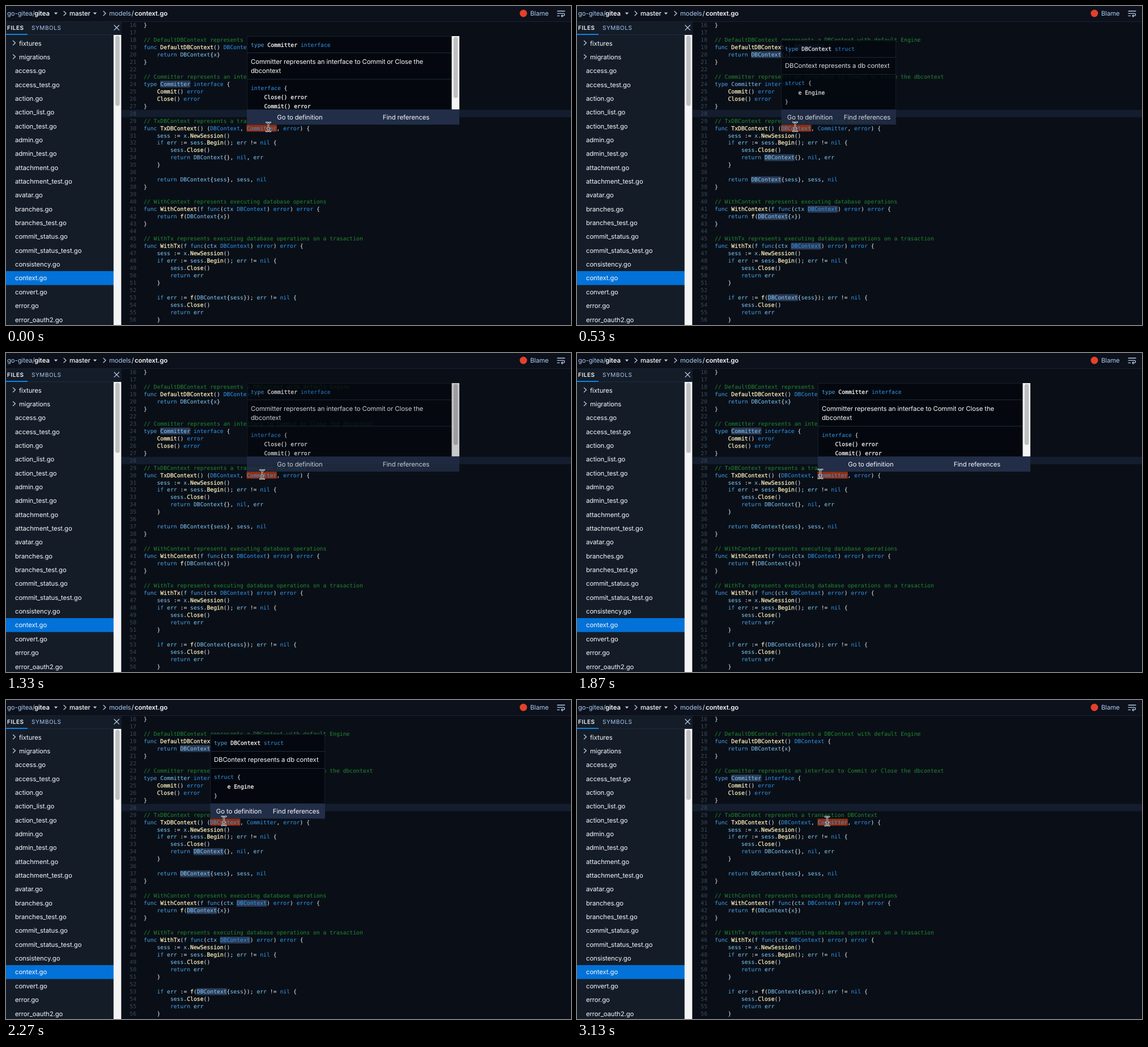
These frames come from a looping animation (997x562 px, 3.19 s). An HTML page:

```html
<!DOCTYPE html>
<html lang="en">
<head>
<meta charset="utf-8">
<title>Code hovers</title>
<style>
  html, body { margin: 0; width: 100%; height: 100%; overflow: hidden; background: #0a0f17; }
  svg { display: block; width: 997px; height: 562px; }
  text { white-space: pre; text-rendering: geometricPrecision; }
  .ui { font: 11.35px Inter, "Open Sans", sans-serif; letter-spacing: -.1px; fill: #f7f9fc; }
  .mono { font: 9.74px "DejaVu Sans Mono", monospace; fill: #edf1f7; }
  .soft { fill: #a8caf0; }
  .medium { font-weight: 500; }
  .bold { font-weight: 600; }
  .tab { font-size: 10px; letter-spacing: .55px; }
  .number { fill: #3c4858; text-anchor: end; }
  .middle { text-anchor: middle; }
  .comment { fill: #21882f; }
  .keyword { fill: #4aa3ea; }
  .type { fill: #2f98f2; }
  .call { fill: #fff3bf; stroke: #fff3bf; stroke-width: .25; }
  .title { fill: #fff; stroke: #fff; stroke-width: .25; }
  .name { fill: #84ccfc; }
  .line { fill: none; stroke: #b9cbe4; stroke-width: 1.3; stroke-linecap: round; stroke-linejoin: round; }
</style>
</head>
<body>
<svg id="stage" viewBox="0 0 997 562"></svg>
<script>
const LOOP = 3190, STEP = 200 / 3;
const CODE_X = 243, CHAR = 5.864, FIRST_LINE = 16;

const code = `}

// DefaultDBContext represents a DBContext with default Engine
func DefaultDBContext() DBContext {
    return DBContext{x}
}

// Committer represents an interface to Commit or Close the dbcontext
type Committer interface {
    Commit() error
    Close() error
}

// TxDBContext represents a transaction DBContext
func TxDBContext() (DBContext, Committer, error) {
    sess := x.NewSession()
    if err := sess.Begin(); err != nil {
        sess.Close()
        return DBContext{}, nil, err
    }

    return DBContext{sess}, sess, nil
}

// WithContext represents executing database operations
func WithContext(f func(ctx DBContext) error) error {
    return f(DBContext{x})
}

// WithTx represents executing database operations on a trasaction
func WithTx(f func(ctx DBContext) error) error {
    sess := x.NewSession()
    if err := sess.Begin(); err != nil {
        sess.Close()
        return err
    }

    if err := f(DBContext{sess}); err != nil {
        sess.Close()
        return err
    }`.split("\n");

const files = ["fixtures", "migrations", "access.go", "access_test.go", "action.go", "action_list.go",
  "action_test.go", "admin.go", "admin_test.go", "attachment.go", "attachment_test.go", "avatar.go",
  "branches.go", "branches_test.go", "commit_status.go", "commit_status_test.go", "consistency.go",
  "context.go", "convert.go", "error.go", "error_oauth2.go"];

const lineY = n => 33.3 + (n - FIRST_LINE) * 12.98;
const rect = (x, y, w, h, fill, rx = 0) =>
  `<rect x="${x}" y="${y}" width="${w}" height="${h}" rx="${rx}" fill="${fill}"/>`;
const label = (x, y, content, cls = "") => `<text class="ui ${cls}" x="${x}" y="${y + 4}">${content}</text>`;
const mono = (x, y, content, cls = "") => `<text class="mono ${cls}" x="${x}" y="${y + 3.5}">${content}</text>`;
const path = (d, cls = "line") => `<path class="${cls}" d="${d}"/>`;
const span = (cls, content) => `<tspan class="${cls}">${content}</tspan>`;
const caret = x => `<path d="M${x - 3.2} 11.5h6.4l-3.2 3.6z" fill="#c3d1e6"/>`;
const chevron = (x, y) => path(`M${x - 2} ${y - 3.7}l4 3.7l-4 3.7`);
const scrollbar = (x, y, height, thumb) =>
  rect(x, y, 13.5, height, "#f4f4f5") + rect(x + 3.2, y + 1.5, 7.6, thumb, "#bfc0c2", 3.8);

function colourLine(source) {
  if (source.startsWith("//")) return span("comment", source);
  return source.replace(/[A-Za-z]\w*/g, (word, at) => {
    const next = source[at + word.length];
    if (/^(func|type|return|if)$/.test(word)) return span("keyword", word);
    if (/^(error|nil|interface|struct)$/.test(word)) return span("type", word);
    if (next === "(") return span("call", word);
    const isType = /^(DBContext|Committer)$/.test(word) && next !== "{" && !source.startsWith("type");
    return span(isType ? "type" : "name", word);
  });
}

function highlights(word) {
  let marks = "";
  code.forEach((source, i) => {
    if (source.startsWith("//")) return;
    for (const match of source.matchAll(new RegExp(`\\b${word}\\b`, "g"))) {
      const line = i + FIRST_LINE;
      marks += rect(CODE_X + match.index * CHAR - .3, lineY(line) - 5.7, word.length * CHAR + .6, 12,
        line === 30 ? "#922f10" : "#2a3a54", 1);
    }
  });
  return `<g id="marks${word}">${marks}</g>`;
}

function header() {
  return rect(0, 0, 997, 27, "#0c111b") + rect(0, 27, 997, 1, "#1a2434") +
    label(2, 13, "go-gitea/", "soft") + label(50, 13, "gitea", "bold") + caret(88) + chevron(104, 13) +
    label(112, 13, "master", "medium") + caret(157) + chevron(174, 13) +
    label(182, 13, "models", "soft") + label(221.5, 13, "/") + label(227, 13, "context.go", "bold") +
    `<circle cx="913" cy="13" r="6.5" fill="#e5402b"/>` + label(925, 13, "Blame", "soft") +
    path("M973 9h13M973 13.2h10.5a2 2 0 0 1 0 4.2h-3.5m1.7-1.8l-1.8 1.8l1.8 1.8M973 17.4h3.5");
}

function sidebar() {
  const pitch = 24.35;
  const rows = files.map((name, i) => {
    const y = 65.5 + i * pitch, folder = i < 2;
    return (name === "context.go" ? rect(0, y - 12.4, 190, pitch + .2, "#0272d8") : "") +
      (folder ? chevron(14.5, y - .5) : "") + label(folder ? 23 : 16, y, name);
  }).join("");
  return rect(0, 28, 204, 534, "#141c28") +
    label(2, 38.3, "FILES", "tab bold") + label(45, 38.3, "SYMBOLS", "tab soft") +
    path("M191 34l8.4 8.4M199.4 34l-8.4 8.4") +
    rect(0, 50, 204, 1, "#202c3f") + rect(0, 49, 38, 2, "#0a84e8") + rows +
    scrollbar(189.8, 51, 511, 123.5);
}

function popup({ id, x, y, width, dividers, body, actions, bar = "" }) {
  return `<g id="popup${id}">` + rect(x, y, width, 209 - y, "#1c273a") +
    rect(x + .7, y + .7, width - 1.4, 208 - y, "#04080e") +
    dividers.map(d => rect(x, d, width, 1, "#1d2a3e")).join("") + body + bar +
    rect(x, 182.3, width, 26.7, "#222e47") +
    actions.map(([cx, name]) => label(cx, 196, name, "middle")).join("") + "</g>";
}

const actionNames = ["Go to definition", "Find references"];
const committerPopup = popup({
  id: "Committer", x: 425, y: 53, width: 375, dividers: [82, 128.5],
  body: mono(432, 68, `${span("keyword", "type")} ${span("title", "Committer")} ${span("type", "interface")}`) +
    label(432, 98, "Committer represents an interface to Commit or Close the") + label(432, 114.3, "dbcontext") +
    mono(432, 144.3, `${span("type", "interface")} {`) +
    mono(432, 160.5, `    ${span("title", "Close() error")}`) + mono(432, 176.8, `    ${span("title", "Commit() error")}`),
  actions: [[518.5, actionNames[0]], [706, actionNames[1]]],
  bar: scrollbar(786.5, 53, 129.5, 107.5)
});
const contextPopup = popup({
  id: "DBContext", x: 360.5, y: 60, width: 202.5, dividers: [90, 120],
  body: mono(367, 75.5, `${span("keyword", "type")} ${span("title", "DBContext")} ${span("type", "struct")}`) +
    label(367, 105, "DBContext represents a db context") +
    mono(367, 135.7, `${span("type", "struct")} {`) +
    mono(367, 152, `    ${span("title", "e Engine")}`) + mono(367, 168, "}"),
  actions: [[411, actionNames[0]], [512, actionNames[1]]]
});

const beam = "M-3.8 -8Q0 -8 0 -5Q0 -8 3.8 -8M0 -5V5M-3.8 8Q0 8 0 5Q0 8 3.8 8M-2 2.5H2";
const cursor = `<g id="cursor" fill="none" stroke-linecap="round">
  <path d="${beam}" stroke="#f4f6f8" stroke-width="2.5"/><path d="${beam}" stroke="#10151c" stroke-width="1"/></g>`;

document.getElementById("stage").innerHTML =
  rect(0, 0, 997, 562, "#0a0f17") + rect(204, 183, 793, 12.8, "#131d2e") +
  highlights("Committer") + highlights("DBContext") +
  code.map((source, i) => {
    const line = i + FIRST_LINE;
    return mono(230, lineY(line), line, "number") + mono(CODE_X, lineY(line), colourLine(source));
  }).join("") +
  header() + sidebar() + committerPopup + contextPopup + cursor;

// Pointer path: time, x, y
const track = [[0, 463, 213], [130, 437, 212.5], [270, 397, 212], [420, 387, 212.5], [620, 385, 213],
  [820, 390, 213.5], [1000, 403, 214], [1170, 425, 214], [1333, 452, 214], [1500, 460, 213.5],
  [1680, 453, 213], [1870, 429, 213], [2060, 398, 213], [2270, 384.5, 213], [2500, 384, 213],
  [2730, 394, 213], [2930, 413, 213.5], [3130, 441, 213.5], [LOOP, 452, 213]];

// Word, highlighted from, popup from, popup until
const hovers = [["Committer", 0, -300, 165], ["DBContext", 330, 390, 1095], ["Committer", 1190, 1200, 1930],
  ["DBContext", 2060, 2060, 2930], ["Committer", 3060, LOOP, LOOP]];
const FADE = 165;

function pointerAt(t) {
  const i = Math.max(0, track.findIndex(p => p[0] > t) - 1);
  const [a, b] = [track[i], track[i + 1]];
  const before = track[Math.max(0, i - 1)], after = track[Math.min(track.length - 1, i + 2)];
  const length = b[0] - a[0], u = (t - a[0]) / length;
  return [1, 2].map(k => {
    const m0 = (b[k] - before[k]) / (b[0] - before[0]) * length;
    const m1 = (after[k] - a[k]) / (after[0] - a[0]) * length;
    return a[k] + u * (m0 + u * (3 * (b[k] - a[k]) - 2 * m0 - m1 + u * (m0 + m1 - 2 * (b[k] - a[k]))));
  });
}

const part = id => document.getElementById(id);
const words = ["Committer", "DBContext"];

function draw(elapsed) {
  const clock = elapsed % LOOP;
  let step = Math.round(clock / STEP);
  if (Math.round(step * STEP / 10) * 10 > clock) step--;
  const t = step * STEP;
  const hover = hovers.filter(h => h[1] <= t).pop();
  for (const word of words) {
    const active = hover[0] === word;
    const shown = active && t < hover[3] ? Math.min(1, Math.max(0, (t - hover[2]) / FADE)) : 0;
    part("marks" + word).setAttribute("visibility", active ? "visible" : "hidden");
    part("popup" + word).setAttribute("opacity", shown);
  }
  part("cursor").setAttribute("transform", `translate(${pointerAt(t)})`);
}

const start = performance.now();
function tick() {
  draw(performance.now() - start);
  requestAnimationFrame(tick);
}
tick();
</script>
</body>
</html>
```
